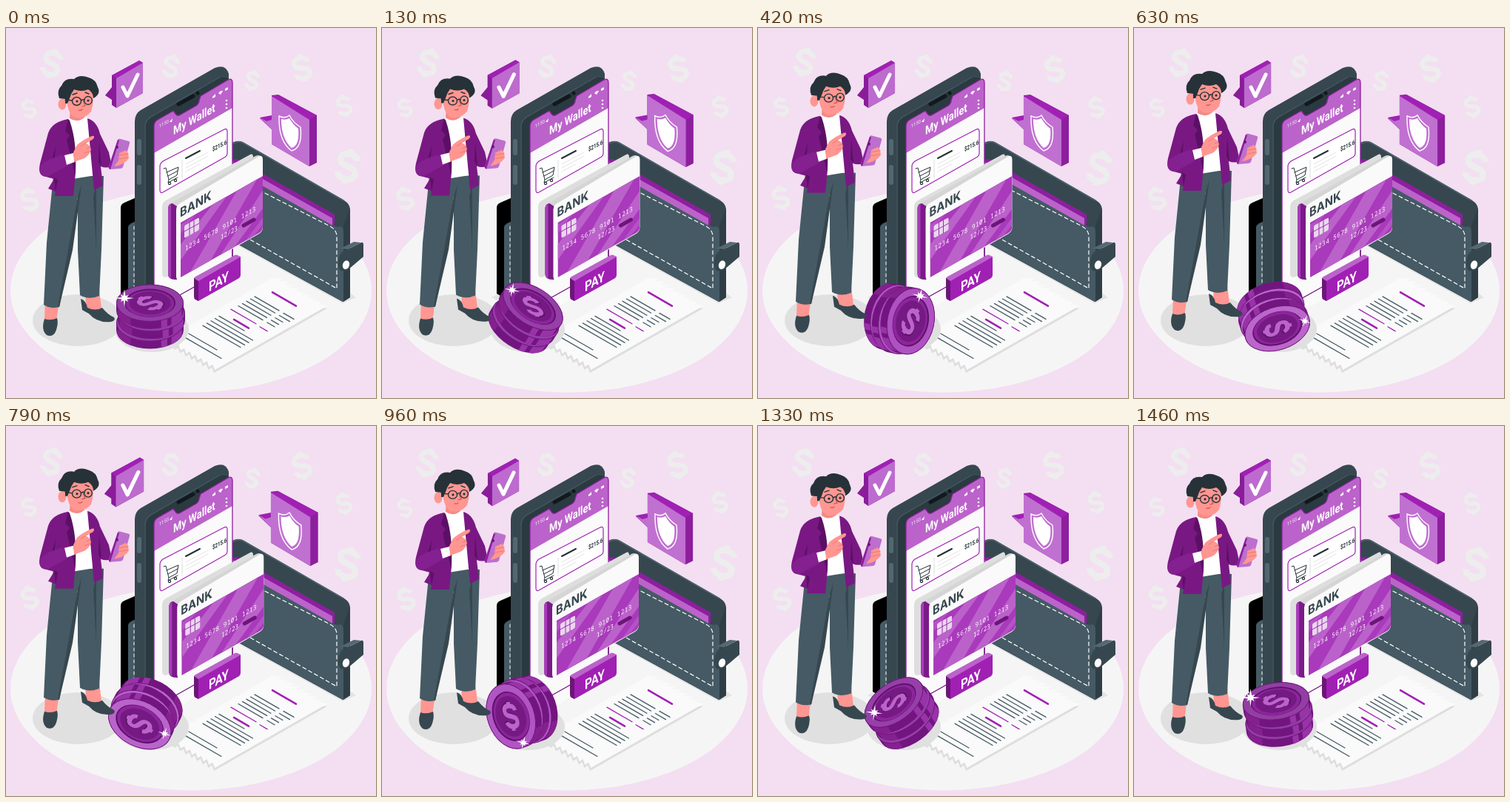
Recreate the animation shown at these times as an HTML page. Size 500x500 px, loop 1500 ms.

```html
<!DOCTYPE html>
<html lang="en">
<head>
<meta charset="utf-8">
<title>My Wallet</title>
<style>
html,body{margin:0;width:100%;height:100%;overflow:hidden;background:#f3dff1}
svg{display:block;width:100vw;height:100vh}
text{font-family:Roboto,sans-serif}
.mono{font-family:"Noto Sans Mono",monospace}
.wide{font-family:Inter,sans-serif}
.ln{fill:none;stroke-linecap:round;stroke-linejoin:round}
</style>
</head>
<body>
<svg viewBox="0 0 500 500">
<defs>
  <g id="dollar" class="ln">
    <path d="M10-8C8-16-10-17-10-7C-10 3 10-3 10 8C10 17-9 17-10 8M0-14V-20M0 14V20" stroke-linecap="butt"/>
  </g>
  <clipPath id="cardArt"><path d="M236 263L347 200V268Q347 274 342 277L236 337Z"/></clipPath>
</defs>

<g id="money" stroke="#ededed" stroke-width="7"></g>
<ellipse cx="250" cy="355" rx="244" ry="137.500" fill="#f5f5f5"/>
<ellipse cx="97" cy="395" rx="61" ry="35" fill="#e0e0e0"/>
<path d="M148 364L176 350L222 376L196 390ZM306 290L455 372L473 364L465 358L330 282Z" fill="#e3e3e3"/>

<!-- wallet -->
<path d="M155 243Q155 238 160 236L176 229V356L164 364L155 359Z" fill="#000"/>
<path d="M165 269Q166 264 176 261V356L165 363Z" fill="#455a64"/>
<path d="M173 268V352" class="ln" stroke="#fff" stroke-dasharray="4 4"/>
<path d="M300 160Q309 150 320 154L457 233Q465 238 465 246V364L455 370L300 285Z" fill="#37474f"/>
<path d="M306 157Q312 152 320 155L456 233" class="ln" stroke="#4d636d" stroke-width="1.500"/>
<path d="M306 178L312 177L444 252V266L436 268L306 194Z" fill="#8d1f9e"/>
<path d="M306 181L441 257V268L306 192Z" fill="#bc63cb"/>
<path d="M300 187L440 266Q447 270 452 268Q456 269 456 276V370L300 284Z" fill="#455a64"/>
<path d="M456 268L465 243V364L456 370Z" fill="#2f3e46"/>
<path d="M326 211L438 268Q447 273 447 282V352L314 277" class="ln" stroke="#fff" stroke-width="1.200" stroke-dasharray="5 4" stroke-linecap="butt"/>
<path d="M449 318Q449 302 462 299L480 290Q483 289 483 293V309L463 326Q449 334 449 318Z" fill="#37474f"/>
<path d="M462 299L480 290L470 289L452 298Z" fill="#546972"/>
<ellipse cx="459.500" cy="320" rx="4.500" ry="6" fill="#fff" transform="rotate(20 459 320)"/>

<!-- phone -->
<path d="M174 126Q174 116 182 111L282 54Q297 48 301 62V312L207 368L190 364L174 354Z" fill="#37474f"/>
<path d="M188 134Q188 125 196 120L288 67Q301 61 301 74V312L200 372L188 364Z" fill="#2b3940"/>
<path d="M188 360V134Q188 125 196 120L288 67Q295 64 299 67" class="ln" stroke="#455a64" stroke-width="1.200"/>
<rect x="177" y="150" width="6" height="22" rx="3" fill="#526871"/>
<rect x="177" y="185" width="6" height="27" rx="3" fill="#526871"/>
<path d="M233 103L253 92" class="ln" stroke="#11191d" stroke-width="5"/>
<circle cx="259" cy="88" r="2.500" fill="#11191d"/>
<path d="M200 133Q200 127 205 124L226 112L229 116Q232 120 236 117L257 105Q261 102 261 98L263 92L300 70Q306 67 306 74V330L240 376L200 372Z" fill="#fafafa"/>
<path d="M200 133Q200 127 205 124L226 112L229 116Q232 120 236 117L257 105Q261 102 261 98L263 92L300 70Q306 67 306 74V108L200 169Z" fill="#bc63cb"/>
<path d="M200 372V133Q200 127 205 124L226 112L229 116Q232 120 236 117L257 105Q261 102 261 98L263 92L300 70Q306 67 306 74V310" class="ln" stroke="#8d1f9e" stroke-width="1.300"/>
<g fill="#fff">
  <text transform="matrix(.8 -.45 0 1 226 144.500)" font-size="16" font-weight="600">My Wallet</text>
  <text transform="matrix(.8 -.45 0 1 207 135)" font-size="6.500">11:53</text>
  <path d="M221 127L225 122L224 127ZM279 95V93L283 89V93ZM287 88Q290 84 293 85L290 90ZM296 82L300 80V83L296 85Z"/>
  <circle cx="298" cy="98" r="1.300"/><circle cx="298" cy="103" r="1.300"/><circle cx="298" cy="108" r="1.300"/>
</g>
<path d="M208 187Q208 183 212 180L295 137Q299 135 299 140V169Q299 173 295 175L212 222Q208 224 208 219Z" fill="#fff" stroke="#a020b4" stroke-width="1.200"/>
<path d="M213 190L216 189L220 205L231 199L233 188L217 195M219 200L232 193M220 205L219 209L232 202" class="ln" stroke="#263238"/>
<g class="ln" stroke="#263238" stroke-width="1.200"><circle cx="221" cy="210" r="1.600"/><circle cx="229" cy="206" r="1.600"/></g>
<path d="M238 178V203" stroke="#ddd"/>
<path d="M243 176L262 166" class="ln" stroke="#263238" stroke-width="2"/>
<path d="M243 184L273 168M243 189L273 173M243 194L262 184" class="ln" stroke="#dcdcdc" stroke-width=".8"/>
<text transform="matrix(.72 -.38 0 1 279 167)" font-size="8.500" font-weight="600" fill="#263238">$215.6</text>
<path d="M211 242Q211 236 216 233L330 171Q334 169 334 175V270L219 336Q211 339 211 331Z" fill="#dedede"/>
<path d="M306 280V310M256 349L215 372" stroke="#6d1579" stroke-width="1.300"/>

<!-- receipt -->
<g id="paper"></g>

<!-- card -->
<g id="card">
  <path d="M219 244Q219 239 224 236L337 173Q343 170 346 175L230 242V340Q219 340 219 332Z" fill="#d5d5d5"/>
  <path d="M219 243Q220 237 225 237L231 241V340Q219 341 219 332Z" fill="#7b1a88"/>
  <path d="M219 243Q220 239 223 238V338Q219 337 219 332Z" fill="#a83cba"/>
  <path d="M230 246Q230 240 235 237L341 174Q347 171 347 178V269Q347 275 342 278L235 339Q230 342 230 335Z" fill="#fafafa"/>
  <g clip-path="url(#cardArt)">
    <path d="M230 180H350V345H230Z" fill="#a93abb"/>
    <path d="M230 300L282 235L300 225L230 322ZM246 335L312 220L340 203L272 322ZM285 314L350 215V240L302 305Z" fill="#bb62ca"/>
    <path d="M230 270L256 252L230 286ZM316 298L350 252V262L326 292Z" fill="#b552c5"/>
  </g>
  <text class="wide" transform="matrix(.866 -.5 0 1 235 256)" font-size="17" font-weight="700" fill="#37474f">BANK</text>
  <path d="M241 269Q241 267 243 266L259 257Q261 256 261 258V271Q261 273 259 274L243 283Q241 284 241 282Z" fill="#ead7ee"/>
  <path d="M241 275L248 271V263M248 271V280M261 264L254 268V260M254 268V277M248 271L254 268" class="ln" stroke="#9c2fb0"/>
  <g fill="#fff">
    <text class="mono" transform="matrix(.866 -.49 0 1 242 301)" font-size="8.800" letter-spacing=".55">1234 5678 9101 1213</text>
    <text class="mono" transform="matrix(.866 -.49 0 1 290 286)" font-size="8.800">12/23</text>
  </g>
  <path d="M321 267L335 259" class="ln" stroke="#6d1579" stroke-width="5"/>
</g>

<!-- button -->
<path d="M254 339Q254 337 256 336L309 307Q311 306 313 307L317 309L260 343Z" fill="#bc63cb"/>
<path d="M254 338L260 342V369L256 367Q254 366 254 363Z" fill="#6d1579"/>
<path d="M260 342L317 309V334Q317 336 315 338L260 369Z" fill="#a020b4"/>
<text transform="matrix(.82 -.47 0 1 274 356.500)" font-size="18.500" font-weight="700" fill="#fff">PAY</text>

<!-- speech bubbles -->
<g id="tick">
  <path d="M143 64L180 44L185 47V88L149 108L143 104V97L134 91L143 80Z" fill="#8a1c9b"/>
  <path d="M143 64L180 44L185 47L149 68Z" fill="#a020b4"/>
  <path d="M149 68L185 47V88L149 108Z" fill="#bd6bce"/>
  <path d="M158 80L164 92L178 63" class="ln" stroke="#fff" stroke-width="5" stroke-linecap="butt"/>
</g>
<g id="guard">
  <path d="M359 91L368 90L420 118V182L410 187L359 157V137L343 122L359 120Z" fill="#8d1f9e"/>
  <path d="M359 92L369 91L420 118L410 124Z" fill="#a020b4"/>
  <path d="M359 92L410 124V187L359 157V137L343 121L359 122Z" fill="#c070d1"/>
  <path d="M343 121L359 118V124L352 126Z" fill="#a020b4"/>
  <path d="M369 119Q377 123 383 118Q388 128 398 134Q401 162 386 166Q368 153 369 119Z" fill="#c070d1" stroke="#fff" stroke-width="1.400"/>
  <path d="M372 123Q378 125 383 122Q388 131 395 136Q397 159 386 162Q372 150 372 123Z" fill="#fff"/>
</g>

<!-- coins -->
<ellipse cx="197" cy="407" rx="50" ry="31" fill="#e0e0e0"/>
<g id="coins"></g>
<path id="star" fill="#fff" d="M0-12L1.500-3L6-4L3.500-1L13 0L3.500 1.500L5 5L1.200 3L0 12L-1.200 3L-5 5L-3.500 1.500L-13 0L-3.500-1L-5-5L-1.500-3Z"/>

<!-- person -->
<g id="person">
  <path d="M53 368H72L68 397L57 402L52 394ZM107 355L126 354L129 379L118 386L108 377Z" fill="#ff9691"/>
  <path d="M52 393Q47 408 55 415Q64 419 68 408Q71 398 69 392Q60 396 52 393ZM101 366Q108 368 110 378Q121 383 130 378Q137 387 146 391Q149 395 142 397Q123 399 112 386L103 381Z" fill="#37474f"/>
  <path d="M64 200L55 290L51 374Q60 380 72 377L87 300L97 228L97 300L100 361Q112 368 126 362L129 300L132 200Z" fill="#455a64"/>
  <path d="M97 228L102 212L90 300L72 377H70L84 300ZM121 215L118 228L122 300V220Z" fill="#37474f"/>
  <path d="M84 122L111 121L121 199L90 204Z" fill="#fff"/>
  <path d="M87 106H105L106 121Q96 129 86 122Z" fill="#f48a86"/>
  <path d="M110 122Q123 126 127 143L139 168L143 187Q135 190 128 187L131 213L119 219Z" fill="#791883"/>
  <path d="M126 155L129 187L125 181Z" fill="#5c1065"/>
  <path d="M84 123Q62 127 57 142L46 183Q43 197 50 200L65 204L57 217L67 221L66 227L91 227L94 196Q96 154 84 123Z" fill="#791883"/>
  <path d="M84 123L80 139L86 145L82 151L93 198Q97 157 86 125ZM67 160L65 185L59 188ZM65 202L70 205L67 222Z" fill="#5c1065"/>
  <path d="M45 190Q49 178 80 171L83 186L56 201Q46 202 45 190Z" fill="#84208f"/>
  <path d="M79 172L91 169L93 181L82 185Z" fill="#fff"/>
  <path d="M91 168L96 158Q104 151 116 146Q121 145 118 150L108 156Q113 157 115 164Q113 172 106 176L92 181Z" fill="#ff9691"/>
  <path d="M107 156L101 160M109 163L114 161M106 169L112 167" class="ln" stroke="#de756f" stroke-width=".8"/>
  <path d="M151 151Q152 149 155 150L166 153Q168 154 167 156L158 188Q157 190 154 190L141 191Q138 190 139 187Z" fill="#bd6fcd"/>
  <path d="M151 151L139 187Q138 190 141 191L153 152Z" fill="#8d1f9e"/>
  <circle cx="150" cy="161" r="2" fill="#6d1579"/>
  <path d="M146 187L152 179L153 169L162 165L165 169L166 176Q160 185 146 187Z" fill="#ff9691"/>
  <path d="M153 172L165 170M153 177L164 175" class="ln" stroke="#de756f" stroke-width=".8"/>
  <path d="M82 86Q81 115 93 121Q106 124 115 113Q120 98 116 82Q99 73 82 86Z" fill="#ff9691"/>
  <ellipse cx="76" cy="103" rx="5.500" ry="7.500" fill="#ff9691"/>
  <path d="M80 102L80 96L72 95Q68 84 75 78Q79 67 92 69Q99 62 112 67Q122 70 124 80Q129 89 118 95Q118 87 111 83Q102 87 92 83Q88 88 86 95L83 102Z" fill="#263238"/>
  <g class="ln" stroke="#263238" stroke-width="1.400">
    <ellipse cx="95.500" cy="99" rx="6" ry="5.500"/><ellipse cx="111" cy="98" rx="5.300" ry="5.500"/>
    <path d="M101.500 98Q104 96 106 97M89 98L80 97M90 90L96 88M107 87L112 89"/>
  </g>
  <circle cx="96" cy="99" r="1.600" fill="#263238"/><circle cx="111" cy="98" r="1.600" fill="#263238"/>
  <path d="M104 98L107 105L103 106M98 111Q101 112 103 110" class="ln" stroke="#c95650" stroke-width="1.200"/>
</g>
</svg>
<script>
const $ = id => document.getElementById(id);
const set = (id, v) => $(id).setAttribute('transform', v);
const TAU = Math.PI * 2, LOOP = 1500, STEPS = 36;

// x, y, height, tilt
const signs = [[62,48,42,15],[223,52,34,15],[31,109,29,-15],[32,232,35,-15],
  [333,71,30,15],[400,54,40,-12],[457,105,32,-12],[462,187,50,12]];
$('money').innerHTML = signs.map(([x, y, h, a]) =>
  `<use href="#dollar" transform="translate(${x} ${y}) rotate(${a}) scale(${h / 42})"/>`).join('');

// s runs up the receipt, u across it
const at = (s, u) => `${216 + s + u} ${424 + (u - s) * .577}`;
const teeth = (s, from, to) => {
  const out = [], n = 9;
  for (let i = 0; i <= n; i++) {
    const u = from + (to - from) * i / n;
    out.push(at(s, u), at(s + 5, u));
  }
  return out;
};
const rule = (s, a, b, c = '#455a64', w = 1.3) =>
  `<path d="M${at(s, a)}L${at(s, b)}" stroke="${c}" stroke-width="${w}"/>`;
const sheet = 'M' + [...teeth(0, -3, 66), ...teeth(147, 67, -3)].join('L') + 'Z';
let paper = `<path d="${sheet}" fill="#dedede" transform="translate(-1 4)"/><path d="${sheet}" fill="#fafafa"/><g class="ln">`;
[18, 25].forEach(s => paper += rule(s, 6, s < 20 ? 57 : 44));
for (let s = 44; s <= 66; s += 5.5) paper += rule(s, 6, s < 62 ? 57 : 40);
for (let s = 91; s <= 118; s += 5.5) paper += rule(s, 7, 40) + rule(s, 46, s < 105 ? 56 : 60);
paper += rule(82, 6, 40, '#a020b4') + rule(81, 46, 56, '#a020b4') +
  rule(72, 20, 40, '#a020b4', 2.6) + rule(130, 14, 46, '#a020b4', 2.6);
$('paper').innerHTML = paper + '</g>';

// smooth looping curve through values at the key steps
const keys = [0, 6, 10, 15, 23, 28, 35];
function curve(vals, k) {
  const n = keys.length;
  const T = i => keys[(i + n) % n] + Math.floor(i / n) * STEPS;
  const V = i => vals[(i + n) % n];
  let i = n - 1;
  while (keys[i] > k) i--;
  const slope = j => (V(j + 1) - V(j - 1)) / (T(j + 1) - T(j - 1));
  const d = T(i + 1) - T(i), u = (k - T(i)) / d, u2 = u * u, u3 = u2 * u;
  return (2 * u3 - 3 * u2 + 1) * V(i) + (u3 - 2 * u2 + u) * d * slope(i) +
    (3 * u2 - 2 * u3) * V(i + 1) + (u3 - u2) * d * slope(i + 1);
}

const R = 45.5;
function coins(k) {
  const cx = curve([194.5, 193.5, 191, 188.5, 189, 193, 194.5], k);
  const cy = curve([390, 393, 393, 390, 387, 386, 390], k);
  const turn = -90 + 10 * k + curve([0, 5, 2, 12, 20, 7, 2], k);
  const spin = -45 + 10 * k + curve([0, 12, -14, -29, -14, -15, -2], k);
  const nz = curve([.55, .58, .7, .64, .7, .6, .55], k);
  const m = Math.sqrt(1 - nz * nz), rx = R * nz;
  const band = (b, t, a1, a2, c) => {
    const p = (x, a) => `${x + rx * Math.cos(a)} ${R * Math.sin(a)}`;
    return `<path fill="${c}" d="M${p(b, a1)}A${rx} ${R} 0 0 1 ${p(b, a2)}L${p(t, a2)}A${rx} ${R} 0 0 0 ${p(t, a1)}Z"/>`;
  };
  const disc = (x, f, c, more = '') =>
    `<ellipse cx="${x}" rx="${rx * f}" ry="${R * f}" fill="${c}" ${more}/>`;
  // the rim is brighter when it leans towards the viewer
  const glow = Math.sin(turn * TAU / 360);
  const rim = `hsl(290 ${47 + glow * 2}% ${52 + glow * 8}%)`;
  let out = `<g transform="translate(${cx} ${cy}) rotate(${turn})">`, t;
  for (let i = 0; i < 3; i++) {
    const b = (-22 + 16 * i) * m;
    t = b + 12 * m;
    out += `<g transform="translate(0 ${i == 1 ? 2 : 0})">`;
    out += `<path fill="#731580" d="M${b} ${-R}H${t}A${rx} ${R} 0 0 1 ${t} ${R}H${b}A${rx} ${R} 0 0 1 ${b} ${-R}Z"/>`;
    out += band(b, t, 1.9, 2.45, '#9833a8') + band(b, t, 2.6, 2.8, '#9833a8') + band(b, t, 3.75, 4.4, '#85208f');
    out += disc(t, .99, rim, 'stroke="#6d1579" stroke-width=".8"') + '</g>';
  }
  out += disc(t, .76, '#5f126b') + disc(t - .8, .72, '#8d259d') + disc(t, .62, '#751a83');
  out += `<g transform="translate(${t} 0) scale(${nz} 1) rotate(${spin - turn})" stroke-width="7">` +
    `<use href="#dollar" stroke="#5c1065" x="1.5" y="1.5"/><use href="#dollar" stroke="#bc63cb"/></g></g>`;
  $('coins').innerHTML = out;
  const sx = curve([160, 193, 219, 231, 191, 161, 157.5], k);
  const sy = curve([365, 347, 362, 396, 428, 413, 367], k);
  const size = curve([1, .7, .85, .7, .75, .75, 1], k);
  set('star', `translate(${sx} ${sy}) rotate(${curve([0, 20, 15, 20, 15, 15, 0], k)}) scale(${size})`);
}

const bump = (k, mid) => {
  const d = Math.abs(k - mid) / 5;
  return d < 1 ? (1 + Math.cos(d * Math.PI)) / 2 : 0;
};
const zoom = (id, x, y, s) => set(id, `translate(${x} ${y}) scale(${s}) translate(${-x} ${-y})`);

function draw(ms) {
  const k = Math.floor((ms % LOOP) * STEPS / LOOP + .1) % STEPS;
  const ph = TAU * k / STEPS;
  set('money', `rotate(${.65 * Math.sin(ph)} 250 138)`);
  set('person', `translate(0 ${-3.7 * (1 - Math.cos(ph))})`);
  const s = 1 + .045 * (bump(k, 5.5) + bump(k, 19));
  zoom('tick', 160, 76, s);
  zoom('guard', 382, 139, s);
  set('card', `translate(${curve([0, 2, -3.5, 2, 0, 2, 0], k)} 0)`);
  coins(k);
}

const start = performance.now();
function tick() {
  draw(performance.now() - start);
  requestAnimationFrame(tick);
}
tick();
</script>
</body>
</html>
```
